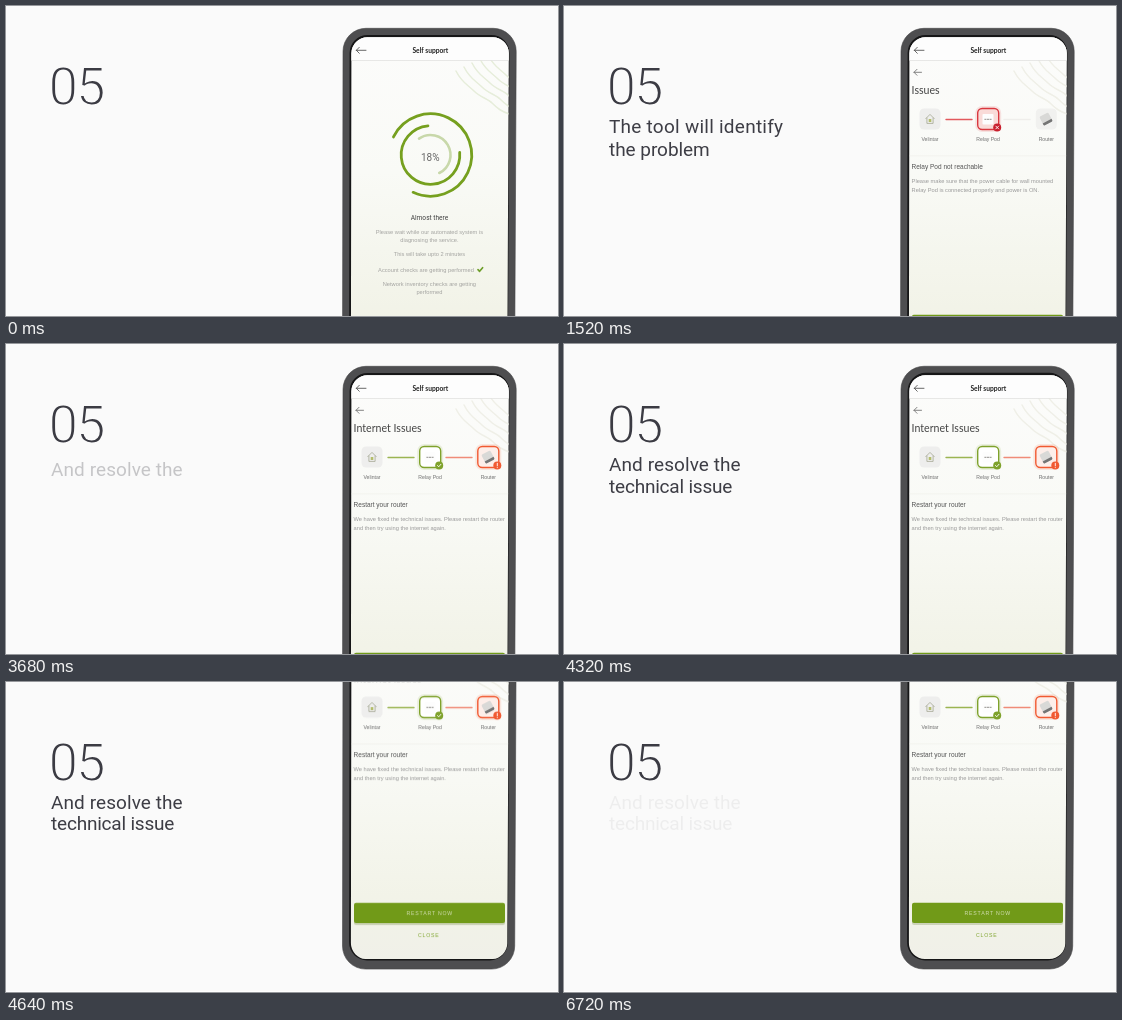
Animation, 552 px wide and 310 px high, one loop 6.8 s. Source, as an HTML page:

```html
<!DOCTYPE html>
<html lang="en">
<head>
<meta charset="utf-8">
<title>Step 05</title>
<style>
  html, body { margin: 0; width: 100%; height: 100%; overflow: hidden; background: #fafafa; }
  svg { display: block; width: 100vw; height: 100vh; }
  text { font-family: "Liberation Sans", Arial, sans-serif; }
  .soft { font-family: Roboto, "Open Sans", sans-serif; }
  .title { font-family: Lato, "Open Sans", sans-serif; }
  .mid { text-anchor: middle; }
</style>
</head>
<body>
<svg id="stage" viewBox="0 0 552 310" xmlns="http://www.w3.org/2000/svg"></svg>
<script>
const LOOP = 6800;
const SCROLL = 88;
const GREEN = '#76a01f', RED = '#d9383f', ORANGE = '#f15a32';

const label = (x, y, size, fill, str, extra = '') =>
  `<text x="${x}" y="${y}" font-size="${size}" fill="${fill}" ${extra}>${str}</text>`;
const line = (d, color, width, extra = '') =>
  `<path d="${d}" fill="none" stroke="${color}" stroke-width="${width}" stroke-linecap="round" stroke-linejoin="round" ${extra}/>`;

// Rounded box whose sides lean in slightly towards the bottom
function shell(l, r, t, b, q) {
  const l2 = l - 0.5, r2 = r - 1.5, turn = `A${q},${q} 0 0 1 `;
  return `M${l},${t + q}${turn}${l + q},${t}H${r - q}${turn}${r},${t + q}` +
    `L${r2},${b - q}${turn}${r2 - q},${b}H${l2 + q}${turn}${l2},${b - q}Z`;
}

function arc(r, from, to, color, width) {
  const at = a => {
    const rad = a * Math.PI / 180;
    return `${(424.5 + r * Math.cos(rad)).toFixed(2)},${(149 + r * Math.sin(rad)).toFixed(2)}`;
  };
  return line(`M${at(from)}A${r},${r} 0 ${to - from > 180 ? 1 : 0} 1 ${at(to)}`, color, width);
}

const arrow = (x, y, w, color) =>
  line(`M${x + w},${y}H${x}m3,-3l-3,3l3,3`, color, 0.8);

function waves(color) {
  let out = '';
  for (let i = 0; i < 5; i++) {
    const x = 450 + i * 8, y = 65 - i * 4;
    out += line(`M${x},${y}c6,12 12,14 18,20s14,8 18,12s10,10 22,12`, color, 1.5);
  }
  return out;
}

function tile(x, fill, stroke) {
  const glow = stroke
    ? `<rect x="${x - 13}" y="100" width="26" height="26" rx="7" fill="${stroke}" opacity=".13"/>` : '';
  return glow + `<rect x="${x - 10.5}" y="102.5" width="21" height="21" rx="4.5" fill="${fill}" ` +
    `stroke="${stroke || 'none'}" stroke-width="1.4"/>`;
}

const badge = (x, color, mark) =>
  `<circle cx="${x}" cy="121.5" r="4" fill="${color}"/>` +
  `<g transform="translate(${x} 121.5)">${line(mark, '#fff', 0.9)}</g>`;

const house = line('M361.8,112.6l4.2,-4.2l4.2,4.2M362.9,112v5.4h6.2v-5.4', '#a5a893', 0.8) +
  '<rect x="364.7" y="113" width="2.6" height="3" fill="#b3bd6a"/>';
const box = '<rect x="418.5" y="108" width="11" height="10.5" rx="1" fill="#fdfdfd"/>' +
  line('M420.8,113.3h6.4', '#8a8683', 0.9, 'stroke-dasharray="1.3 1.3"');
const router = `<g transform="rotate(-28 482 113)">
  <rect x="477" y="108" width="10" height="10" rx="1.4" fill="#d9d9d7"/>
  <path d="M477,115.3h10v1.5q0,1.2 -1.2,1.2h-7.6q-1.2,0 -1.2,-1.2z" fill="#747474"/></g>`;

function issueScreen(s) {
  const tag = (x, str) => label(x, 134.8, 5.1, '#6e6e6e', str, 'class="mid"');
  return waves('#efefe7') + arrow(350, 66.3, 7.5, '#666') +
    label(347.6, 88, 10.6, '#444', s.title, 'class="title"') +
    line('M382,113.5H408', s.first, 1.4) + line('M440,113.5H466', s.second, 1.4) +
    tile(366, '#eeeeed') + house + tile(424.2, s.boxFill, s.boxColor) + box +
    badge(433.2, s.badgeColor, s.boxMark) +
    tile(482.3, s.routerColor ? '#fdeee9' : '#f1f1ef', s.routerColor) + router +
    (s.routerColor ? badge(491.3, s.routerColor, 'M0,-2.2V.4M0,2.1V2.2') : '') +
    tag(366, 'Velintar') + tag(424, 'Relay Pod') + tag(482.3, 'Router') +
    line('M346,149.8H502', '#f1f1ed', 0.8) +
    label(347.6, 163.2, 6.5, '#555', s.head) +
    s.body.map((str, i) => label(347.6, 177.3 + i * 8.8, 5.7, '#999', str)).join('') +
    `<rect x="348" y="311" width="151" height="20" rx="2" fill="#5f7a2a" opacity=".25"/>
     <rect x="348" y="308.7" width="151" height="20.4" rx="2" fill="#719a18"/>` +
    label(423.8, 321.2, 5.2, '#d3dfb4', 'RESTART NOW', 'class="mid" letter-spacing=".8"') +
    label(422.8, 343.2, 5.2, '#7fa52e', 'CLOSE', 'class="mid" letter-spacing=".8"');
}

const waitLines = [
  [228, 'Please wait while our automated system is'], [236, 'diagnosing the service.'],
  [249.6, 'This will take upto 2 minutes'], [280, 'Network inventory checks are getting'], [288, 'performed']
];
const waitScreen = waves('#e6edda') +
  `<g id="rings">${arc(41.2, 206, 475, GREEN, 2.8)}${arc(29.3, -5, 265, GREEN, 2.8)}${arc(20, 235, 424, '#c8d8aa', 2.6)}</g>` +
  label(424.3, 155.2, 10, '#666', '18%', 'class="soft mid"') +
  label(423.5, 214, 6.6, '#444', 'Almost there', 'class="soft mid"') +
  waitLines.map(([y, str]) => label(423.4, y, 5.7, '#a3a3a0', str, 'class="mid"')).join('') +
  label(420, 266.2, 5.7, '#a3a3a0', 'Account checks are getting performed', 'class="mid"') +
  line('M472,263.6l1.6,1.7l3,-3.6', '#6f9f2c', 1.7);

const faultScreen = issueScreen({
  title: 'Issues', first: '#e2595d', second: '#efeeeb',
  boxFill: '#f9dbd8', boxColor: RED, badgeColor: '#c81f2d', boxMark: 'M-1.4,-1.4L1.4,1.4M1.4,-1.4L-1.4,1.4',
  head: 'Relay Pod not reachable',
  body: ['Please make sure that the power cable for wall mounted', 'Relay Pod is connected properly and power is ON.']
});
const fixedScreen = issueScreen({
  title: 'Internet Issues', first: '#9bb552', second: '#f08c78',
  boxFill: '#fff', boxColor: '#7fa22c', badgeColor: '#7fa22c', boxMark: 'M-1.7,0l1.2,1.3l2.2,-2.5',
  routerColor: ORANGE, head: 'Restart your router',
  body: ['We have fixed the technical issues. Please restart the router', 'and then try using the internet again.']
});

const captions = [
  { start: 0, out: 2270, end: 2810, rows: [['The tool will identify', 126.5, 0.25], ['the problem', 150.2, -0.05]] },
  { start: 3520, out: 6120, end: 6760, rows: [['And resolve the', 126.5, 0.08], ['technical issue', 148.3, -0.2]] }
];

const $ = id => document.getElementById(id);
$('stage').innerHTML = `
  <defs>
    <linearGradient id="paper" x1="0" y1="0" x2="0" y2="1">
      <stop offset="0" stop-color="#fcfcfb"/><stop offset=".4" stop-color="#f9faf6"/>
      <stop offset=".8" stop-color="#f2f3e8"/><stop offset="1" stop-color="#f0f0e8"/>
    </linearGradient>
    <clipPath id="glass"><path d="${shell(345.4, 502.8, 31.2, 365, 16)}"/></clipPath>
  </defs>
  <rect width="552" height="310" fill="#fafafa"/>
  <text class="soft" x="42.3" y="98.6" font-size="53.5" letter-spacing="-2.6" fill="#3b3b43" stroke="#fafafa" stroke-width="2.1">05</text>
  ${captions.map((c, i) => c.rows.map(([str, y, gap], j) =>
    label(45, y, 19, '#3d3d45', str, `id="row${i}${j}" class="soft" letter-spacing="${gap}"`)).join('')).join('')}
  <g id="phone">
    <rect y="397" width="552" height="90" fill="#fff"/>
    <path d="${shell(337, 510.2, 22.3, 375, 23)}" fill="#4e4e50" stroke="#434345" stroke-width=".6"/>
    <path d="${shell(343.6, 503.4, 28.9, 366.4, 18)}" fill="#161617"/>
    <g clip-path="url(#glass)">
      <rect x="340" y="30" width="170" height="340" fill="url(#paper)"/>
      <g id="wait">${waitScreen}</g>
      <g id="fault">${faultScreen}</g>
      <g id="fixed">${fixedScreen}</g>
      <rect x="340" y="30" width="170" height="24" fill="#fdfdfd"/>
      <rect x="340" y="54" width="170" height=".8" fill="#e3e3e1"/>
      ${arrow(350.3, 44.3, 9.7, '#444')}
      ${label(424.4, 46.5, 6.7, '#222', 'Self support', 'class="title mid" font-weight="bold"')}
    </g>
  </g>`;

const ramp = (t, a, b) => Math.min(1, Math.max(0, (t - a) / (b - a)));
const easeOut = p => 1 - (1 - p) ** 4;
const easeInOut = p => p < 0.5 ? 16 * p ** 5 : 1 - 16 * (1 - p) ** 5;
const fade = (id, v) => $(id).setAttribute('opacity', v.toFixed(3));

function draw(t) {
  captions.forEach((c, i) => c.rows.forEach((_, j) => {
    const s = c.start + j * 200;
    const rise = 13 * (1 - easeOut(ramp(t, s, s + (j ? 1080 : 780))));
    const id = `row${i}${j}`;
    $(id).setAttribute('transform', `translate(0 ${rise.toFixed(2)})`);
    fade(id, ramp(t, s + 20, s + 530) * (1 - ramp(t, c.out, c.end)));
  }));

  const found = ramp(t, 20, 280), solved = ramp(t, 3130, 3350);
  fade('wait', 1 - found);
  fade('fault', found * (1 - solved));
  fade('fixed', solved);
  $('rings').setAttribute('transform', `rotate(${(Math.min(t, 300) * 0.12).toFixed(2)} 424.5 149)`);
  const lift = SCROLL * easeInOut(ramp(t, 4270, 4700));
  $('phone').setAttribute('transform', `translate(0 ${(-lift).toFixed(2)})`);
}

let origin = null;
function tick(now) {
  if (origin === null) origin = now;
  draw((now - origin) % LOOP);
  requestAnimationFrame(tick);
}
draw(0);
requestAnimationFrame(tick);
</script>
</body>
</html>
```
